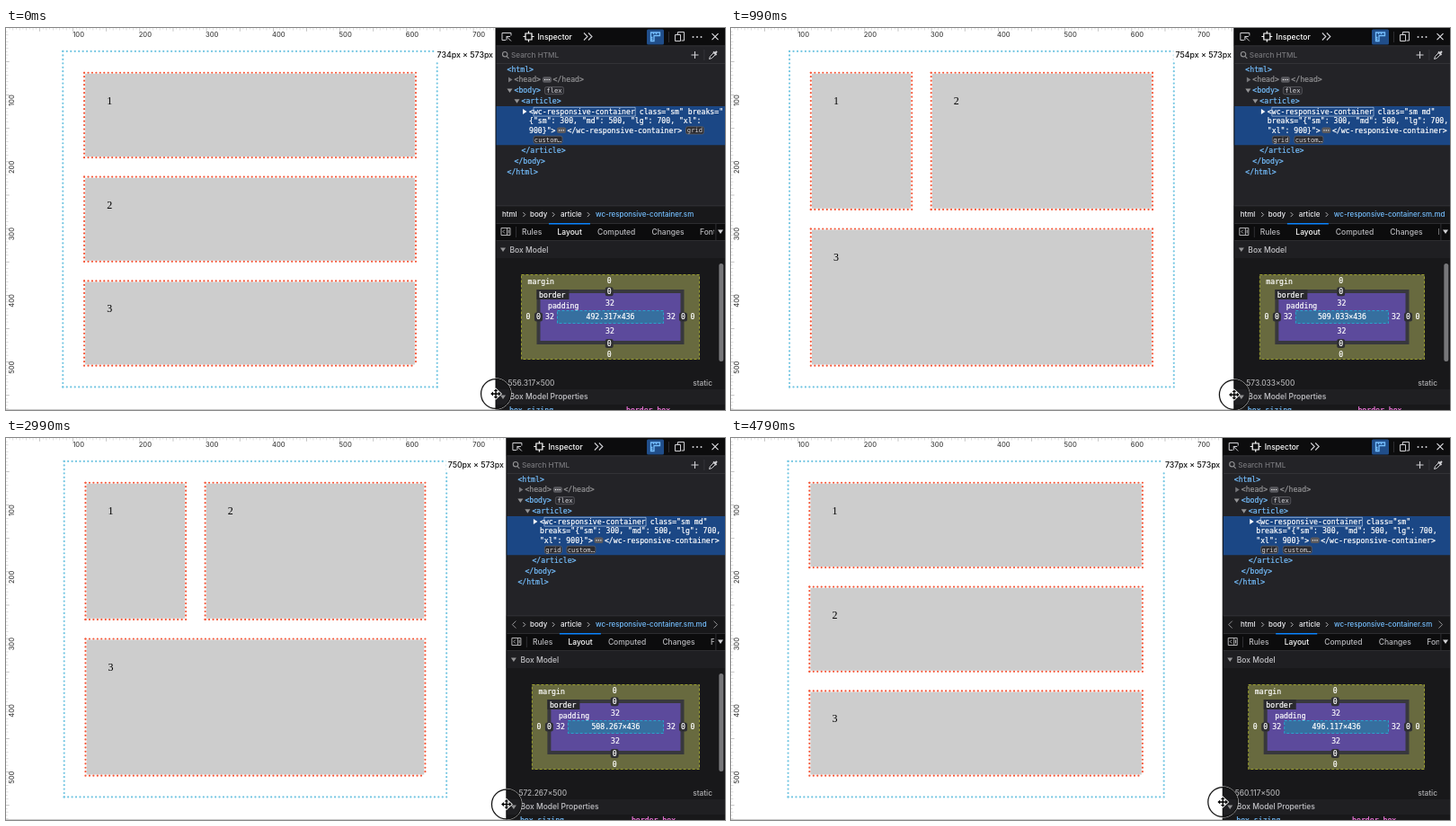
These frames come from a looping animation (800 px wide and 425 px high, 4.99 s). An HTML page with a canvas:

```html
<!DOCTYPE html>
<html>
<head>
<meta charset="utf-8">
<style>
  html, body { margin: 0; width: 100%; height: 100%; overflow: hidden; background: #fff; }
  canvas { display: block; }
</style>
</head>
<body>
<canvas id="stage" width="800" height="425"></canvas>
<script>
const g = document.getElementById('stage').getContext('2d');
const ZOOM = 0.7425, LOOP = 4990, STEP = 200, FIRST = 190;
const UI = 'Inter, sans-serif', MONO = '"DejaVu Sans Mono", monospace', SERIF = '"Liberation Serif", serif';
const CHAR = 4.92;

// Viewport width and the (lagging) width shown by the inspector, one value per step
const widths = [734, 738, 743, 747, 751, 754, 757, 758, 758, 758, 758, 758, 758,
  757, 753, 750, 746, 743, 742, 738, 738, 737, 737, 737, 737];
const measured = [732, 735, 735, 743, 747, 754, 757, 758, 758, 758, 758, 758, 758,
  758, 757, 753, 748, 748, 742, 738, 738, 737, 737, 737, 737];
const cursorPath = [[0, 407], [990, 408], [1590, 409], [2590, 409], [3390, 406], [4790, 405], [LOOP, 405]];

const isWide = w => w * 0.76 - 64 >= 500;

function along(path, t) {
  const i = path.findIndex(p => p[0] > t), [a, b] = [path[i - 1], path[i]];
  return a[1] + (b[1] - a[1]) * (t - a[0]) / (b[0] - a[0]);
}

function rect(x, y, w, h, color, radius = 0) {
  g.fillStyle = color;
  g.beginPath();
  g.roundRect(x, y, w, h, radius);
  g.fill();
}

function frame(x, y, w, h, color, dash = [], radius = 0) {
  g.strokeStyle = color;
  g.lineWidth = 0.8;
  g.setLineDash(dash);
  g.beginPath();
  g.roundRect(x, y, w, h, radius);
  g.stroke();
  g.setLineDash([]);
}

function text(str, x, y, color, size = 8.5, family = UI, align = 'left') {
  g.font = `${family === UI ? 500 : 400} ${size}px ${family}`;
  g.fillStyle = color;
  g.textAlign = align;
  g.textBaseline = 'alphabetic';
  g.fillText(str, x, y + size * 0.35);
}

// Code text gets a hairline to look a little heavier
function mono(str, x, y, color = '#fff', align) {
  text(str, x, y, color, 8.17, MONO, align);
  g.strokeStyle = color;
  g.lineWidth = 0.2;
  g.strokeText(str, x, y + 8.17 * 0.35);
}

function stroke(d, x, y, color, width = 1) {
  g.save();
  g.translate(x, y);
  g.strokeStyle = color;
  g.lineWidth = width;
  g.stroke(new Path2D(d));
  g.restore();
}

function fill(d, x, y, color) {
  g.save();
  g.translate(x, y);
  g.fillStyle = color;
  g.fill(new Path2D(d));
  g.restore();
}

const arrowDown = (x, y, color = '#939395') => fill('M-3-2H3L0 2.5z', x, y, color);
const arrowRight = (x, y, color) => fill('M-2-3V3L2.5 0z', x, y, color);

function clipped(x, y, w, h, paint) {
  g.save();
  g.beginPath();
  g.rect(x, y, w, h);
  g.clip();
  paint();
  g.restore();
}

function dottedSide(x1, y1, x2, y2) {
  const length = Math.hypot(x2 - x1, y2 - y1);
  g.setLineDash([0, length / Math.round(length / (6 * ZOOM))]);
  g.beginPath();
  g.moveTo(x1, y1);
  g.lineTo(x2, y2);
  g.stroke();
}

// Round-dotted outline just outside a box
function dotted(x, y, w, h, color) {
  const o = 1.5 * ZOOM, l = x - o, t = y - o, r = x + w + o, b = y + h + o;
  g.save();
  g.strokeStyle = color;
  g.lineWidth = 3 * ZOOM;
  g.lineCap = 'round';
  dottedSide(l, t, r, t);
  dottedSide(r, t, r, b);
  dottedSide(l, b, r, b);
  dottedSide(l, t, l, b);
  g.restore();
}

function drawRulers() {
  for (let i = 5; i < 800; i += 5) {
    const p = i * ZOOM, len = i % 50 ? (i % 10 ? 1.6 : 2.6) : 3.7;
    const color = i % 50 ? '#ccc' : '#aaa';
    rect(p, 0, 0.7, len, color);
    rect(0, p, len, 0.7, color);
    if (i % 100) continue;
    text(i, p + 6.4, 7.2, '#444', 7.5, UI, 'center');
    g.save();
    g.translate(6.7, p + 6.4);
    g.rotate(-Math.PI / 2);
    text(i, 0, 0, '#444', 7.5, UI, 'center');
    g.restore();
  }
}

function drawPage(W, X) {
  rect(0, 0, 800, 425, '#fff');
  drawRulers();
  const w = W * 0.76, left = X / 2 - 1 - w * ZOOM / 2, top = 27.1;
  dotted(left, top, w * ZOOM, 500 * ZOOM, '#74c6e2');

  const inner = w - 64, col = (inner - 64) / 3;
  const items = isWide(W)
    ? [[0, 0, col, 202], [col + 32, 0, 2 * col + 32, 202], [0, 234, inner, 202]]
    : [0, 156, 312].map(y => [0, y, inner, 124]);
  items.forEach((box, i) => {
    let [x, y, bw, bh] = box.map(v => v * ZOOM);
    x += left + 32 * ZOOM;
    y += top + 32 * ZOOM;
    rect(x, y, bw, bh, '#cdcdcd');
    dotted(x, y, bw, bh, '#f5583a');
    text(i + 1, x + 24, y + 29.7, '#000', 12, SERIF);
  });

  rect(X - 67.5, 23, 67.5, 14.5, '#fff');
  text(`${W}px × 573px`, X - 3, 30.3, '#111', 8.75, UI, 'right');
  rect(0, 424, X, 1, '#ccc');
}

function drawToolbars(X) {
  rect(X, 0, 800 - X, 425, '#232327');
  rect(X, 0, 800 - X, 19.5, '#0c0c0d');
  rect(X, 19.5, 800 - X, 0.8, '#38383d');
  rect(X, 39, 800 - X, 0.8, '#38383d');
  stroke('M-1 4H-5V-4H5V-1M0 0L5 5M0 4V0H4', X + 12, 9.5, '#d0d0d4');
  stroke('M-3.5-3.5H3.5V3.5H-3.5zM0-6V-3.5M0 3.5V6M-6 0H-3.5M3.5 0H6', X + 36.5, 9.5, '#fff', 1.2);
  text('Inspector', X + 46.5, 10, '#fff');
  stroke('M-4.5-4L-.5 0L-4.5 4M.5-4L4.5 0L.5 4', X + 102.5, 9.5, '#d0d0d4', 1.1);

  rect(713, 1.5, 19, 17, '#204e8a', 1.5);
  stroke('M-5-4.5H5V-1H-1.5V5H-5zM-2-4.5V-2.5M1-4.5V-2.5M-5 1H-3M-5 3H-3', 722.5, 9.5, '#75bfff', 1.3);
  rect(737, 4, 0.8, 12, '#38383d');
  stroke('M-2-2V-5H5V4.5H2M-5-2H1V5H-5z', 749.5, 9.5, '#d0d0d4');
  for (const x of [764.5, 769, 773.5]) rect(x - 1, 9, 2, 2, '#d0d0d4', 1);
  stroke('M-3.5-3.5L3.5 3.5M3.5-3.5L-3.5 3.5', 789, 9.7, '#e0e0e4', 1.1);

  stroke('M2.4-.8A2.7 2.7 0 1 1-3-.8A2.7 2.7 0 1 1 2.4-.8M1.6 1.3L4 4', X + 10.5, 30, '#939395', 1.1);
  text('Search HTML', X + 17, 30.2, '#77777b', 8.2);
  stroke('M-4 0H4M0-4V4', 766.5, 30, '#d0d0d4', 1.1);
  rect(776.5, 24, 0.8, 12, '#38383d');
  stroke('M-4.5 4.5L-3.5 1.5L1-3L3-1L-1.5 3.5z', 787, 30, '#d0d0d4');
  stroke('M0-3.5L3.5 0M2-2L4-4', 787, 30, '#d0d0d4', 2);
}

function ellipsis(x, y) {
  rect(x, y - 3.3, 10, 6.6, '#5a5a5f', 2);
  for (const dx of [2.6, 5, 7.4]) rect(x + dx - 0.6, y - 0.6, 1.2, 1.2, '#eee');
}

function badge(label, x, y, w) {
  rect(x, y - 4, w, 8.2, '#2b2b30', 2);
  frame(x, y - 4, w, 8.2, '#5f5f64', [], 2);
  text(label, x + w / 2, y - 0.2, '#d7d7db', 7.2, MONO, 'center');
}

function drawTree(W, X, className) {
  const tag = (name, x, y, color = '#75bfff') => mono(name, X + x, y, color);
  tag('<html>', 12.5, 45.7);
  arrowRight(X + 16, 57.5, '#77777b');
  tag('<head>', 20.5, 57.5, '#939395');
  ellipsis(X + 52, 57.5);
  tag('</head>', 63.5, 57.5, '#939395');
  arrowDown(X + 15.5, 69.5);
  tag('<body>', 20.5, 69.5);
  badge('flex', X + 54.5, 69.5, 21);
  arrowDown(X + 23.5, 81.2);
  tag('<article>', 28.5, 81.2);

  rect(X, 87, 800 - X, 43.3, '#1b4785');
  arrowRight(X + 32, 93, '#fff');
  const x = X + 37, rows = [93, 103.5, 113.8, 124.2];
  const open = `<wc-responsive-container class="${className}"`;
  const close = '</wc-responsive-container>';
  // Text wraps as the panel narrows: first line, second line, before and after the ellipsis, last line
  const [first, second, before, after, last] =
    W < 736 ? [open + ' breaks="', '{"sm": 300, "md": 500, "lg": 700, "xl":', '900}">', close, ''] :
    W < 756 ? [open, 'breaks="{"sm": 300, "md": 500, "lg": 700,', '"xl": 900}">', close, ''] :
      [open, 'breaks="{"sm": 300, "md": 500, "lg":', '700, "xl": 900}">', '</wc-responsive-', 'container>'];
  mono(first, x, rows[0]);
  mono(second, x, rows[1]);
  mono(before, x, rows[2]);
  const dots = x + before.length * CHAR + 1.5;
  ellipsis(dots, rows[2]);
  mono(after, dots + 11.5, rows[2]);
  mono(last, x, rows[3]);
  frame(x + 5, 88.3, 23 * CHAR, 9.8, 'rgba(210,225,245,.75)');
  if (W < 736) {
    badge('grid', dots + 143.5, rows[2], 20);
    badge('custom…', x + 5, rows[3], 32);
  } else {
    const end = x + last.length * CHAR + (last ? 4 : 5.5);
    badge('grid', end, rows[3], 19);
    badge('custom…', end + 24.5, rows[3], 32);
  }

  tag('</article>', 28.5, 136.3);
  tag('</body>', 20.5, 148.3);
  tag('</html>', 12.5, 160.2);
}

function drawBreadcrumbs(X, className, scrolls) {
  rect(X, 198, 800 - X, 19, '#18181a');
  rect(X, 197.5, 800 - X, 0.8, '#38383d');
  const y = 207.6, marked = className.includes('md');
  const wc = scrolls ? 782 - (marked ? 126 : 111) : X + 111;
  const clipLeft = scrolls ? X + 15 : X;
  clipped(clipLeft, 198, (scrolls ? 784 : 800) - clipLeft, 19, () => {
    const crumbs = [['html', -104], ['body', -73], ['article', -39]];
    for (const [name, dx] of crumbs) text(name, wc + dx, y, '#f0f0f4', 7.95);
    for (const dx of [-79.5, -47, -8]) stroke('M-1.2-2.5L1.3 0L-1.2 2.5', wc + dx, y, '#b1b1b3');
    text('wc-responsive-container.' + className.replace(' ', '.'), wc, y, '#75bfff', 7.95);
  });
  if (scrolls) {
    stroke('M2-4L-2 0L2 4', X + 8.5, y, '#939395');
    stroke('M-2-4L2 0L-2 4', 789.5, y, '#939395');
  }
}

function drawTabs(X) {
  rect(X, 217, 800 - X, 20, '#0c0c0d');
  rect(X, 217, 800 - X, 0.8, '#38383d');
  rect(X, 236, 800 - X, 0.8, '#38383d');
  rect(X + 59, 217, 46, 1.5, '#0a84ff');
  stroke('M-5-4H5V4H-5zM1.5-4V4M3.3-2V2M-1-2L-3 0L-1 2', X + 11, 226.5, '#b1b1b3');
  rect(X + 22, 221, 0.8, 12, '#38383d');
  clipped(X, 217, 788 - X, 20, () => {
    const tabs = [['Rules', 29], ['Layout', 68.5], ['Computed', 113], ['Changes', 173.5], ['Fonts', 227]];
    for (const [name, dx] of tabs) text(name, X + dx, 226.6, name === 'Layout' ? '#fff' : '#b8b8bc');
  });
  rect(789.5, 218, 0.8, 18, '#38383d');
  arrowDown(795, 226.5, '#d0d0d4');
}

function drawBoxModel(X, shown, scrollbar) {
  rect(X, 237, 800 - X, 188, '#18181a');
  rect(X, 237, 800 - X, 19, '#1f1f22');
  arrowDown(X + 8, 246.5);
  text('Box Model', X + 15.5, 246.6, '#c4c4c8');
  rect(X, 402, 800 - X, 17, '#1f1f22');
  arrowDown(X + 8, 410.5);
  text('Box Model Properties', X + 15.5, 410.5, '#c4c4c8');

  const mid = (X + 800) / 2 - 0.5, left = X + 28.5, w = 771.5 - left;
  rect(left, 274.5, w, 94, '#686a3f');
  frame(left, 274.5, w, 94, '#b3b832', [3, 2]);
  rect(left + 17, 291, w - 34, 61, '#38383d');
  rect(left + 21, 295, w - 42, 53, '#5c4a9c');
  rect(left + 40, 314.5, w - 80, 14, '#366f9f');
  frame(left + 40, 314.5, w - 80, 14, '#20b5d8', [3, 2]);

  rect(left + 17, 291, 36, 11, '#2a2a2e');
  mono('margin', X + 35.5, 282.5);
  mono('border', X + 48, 296.7);
  mono('padding', X + 58, 308.7);

  const value = (v, x, y) => mono(v, x, y, '#fff', 'center');
  const pill = (x, y) => {
    rect(x - 4.5, y - 5, 9, 10, '#2f2f33', 2.5);
    value(0, x, y);
  };
  value(0, mid - 0.8, 281);
  pill(mid - 0.8, 293.2);
  value(32, mid, 305.8);
  value(32, mid, 337.5);
  pill(mid - 0.8, 351);
  value(0, mid - 0.8, 363);
  value(0, X + 36, 321.5);
  pill(X + 47.5, 321.5);
  value(32, X + 60, 321.5);
  value(32, 740, 321.5);
  pill(753.5, 321.5);
  value(0, 764, 321.5);

  // Lengths snap down to sixtieths of a pixel
  const size = Math.floor(shown * 0.76 * 60 + 1e-6) / 60;
  const show = v => +v.toFixed(3);
  value(`${show(size - 64)}×436`, mid + 0.5, 321.5);
  text(`${show(size)}×500`, X + 13.5, 395.3, '#b1b1b3', 8.3);
  text('static', 786, 395.3, '#b1b1b3', 8.3, UI, 'right');
  mono('box-sizing', X + 15, 425, '#75bfff');
  mono('border-box', mid + 18, 425, '#ff7de9');
  if (scrollbar) rect(793.3, 262, 5, 109, '#77777a', 2.5);
}

function drawCursor(x, y) {
  for (const [r, width, color] of [[17.2, 0.8, '#d8d8d8'], [16.4, 1.2, '#111']]) {
    g.strokeStyle = color;
    g.lineWidth = width;
    g.beginPath();
    g.arc(x, y, r, 0, 7);
    g.stroke();
  }
  const arrows = 'M-5.8 0L-3-2.6V-.7H-.7V-3H-2.3L0-5.5L2.3-3H.7V-.7H3V-2.6L5.8 0L3 2.6V.7H.7V3H2.3L0 5.5L-2.3 3H-.7V.7H-3V2.6z';
  stroke(arrows, x, y, '#fff', 1.6);
  fill(arrows, x, y, '#000');
}

function draw(now) {
  const t = now % LOOP;
  const step = t < FIRST ? 0 : 1 + Math.floor((t - FIRST) / STEP);
  const start = step ? FIRST + (step - 1) * STEP : 0;
  const W = widths[step], X = W * ZOOM;
  const className = isWide(widths.at(step - 1)) ? 'sm md' : 'sm';
  const resting = W === widths.at(step - 3);
  drawPage(W, X);
  drawToolbars(X);
  drawTree(W, X, className);
  drawBreadcrumbs(X, className, step > 5);
  drawTabs(X);
  drawBoxModel(X, measured[step], !resting);
  rect(X - 0.5, 0, 1, 425, '#0c0c0d');
  drawCursor(X, along(cursorPath, start));
}

const origin = performance.now();
function tick() {
  draw(performance.now() - origin);
  requestAnimationFrame(tick);
}
tick();
</script>
</body>
</html>
```
